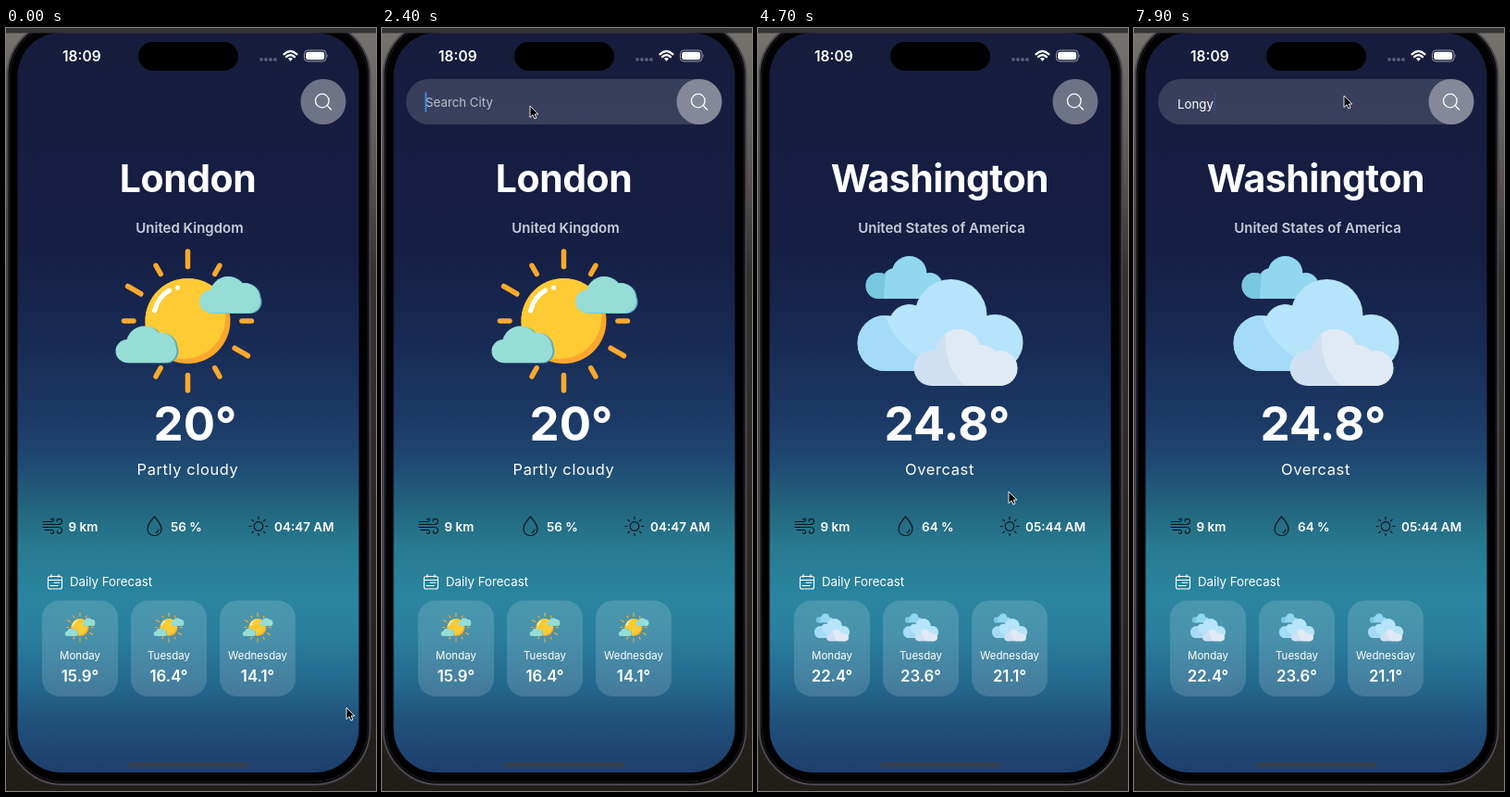
These frames come from a looping animation (400x823 px, 8 s). An HTML page:

```html
<!DOCTYPE html>
<html lang="en">
<head>
<meta charset="utf-8">
<title>Weather app</title>
<style>
html, body { margin: 0; width: 100%; height: 100%; overflow: hidden; background: #25231f; }
svg { display: block; width: 100vw; height: 100vh; font-family: Inter, Roboto, sans-serif; fill: #fff; }
.mid { text-anchor: middle; }
.city { font-size: 41px; font-weight: 700; letter-spacing: -.5px; }
.land { font-size: 15px; font-weight: 600; fill: #c9cdd9; }
.temp { font-size: 51px; font-weight: 700; }
.sky { font-size: 16.5px; letter-spacing: .6px; }
.stat { font-size: 13.5px; font-weight: 600; }
.clock { font-size: 15.5px; font-weight: 600; }
.label { font-size: 13.3px; }
.day { font-size: 11.5px; }
.deg { font-size: 16.8px; font-weight: 600; }
.line { fill: none; stroke-linecap: round; stroke-linejoin: round; }
</style>
</head>
<body>
<svg viewBox="0 0 400 823" preserveAspectRatio="none">
  <defs>
    <linearGradient id="room" x2="0" y2="1">
      <stop offset="0" stop-color="#77746f"/><stop offset=".2" stop-color="#56524f"/>
      <stop offset=".32" stop-color="#34302c"/><stop offset="1" stop-color="#211e19"/>
    </linearGradient>
    <linearGradient id="night" gradientUnits="userSpaceOnUse" x1="0" y1="0" x2="0" y2="800">
      <stop offset="0" stop-color="#161c3b"/><stop offset=".3" stop-color="#151f44"/>
      <stop offset=".42" stop-color="#182a54"/><stop offset=".53" stop-color="#1c3a66"/>
      <stop offset=".59" stop-color="#1f4b73"/><stop offset=".65" stop-color="#23667f"/>
      <stop offset=".7" stop-color="#277a91"/><stop offset=".77" stop-color="#2a859f"/>
      <stop offset=".82" stop-color="#297e9d"/><stop offset=".88" stop-color="#246a8f"/>
      <stop offset=".94" stop-color="#204f79"/><stop offset="1" stop-color="#1e3f6b"/>
    </linearGradient>
    <clipPath id="strip"><rect x="26" y="610" width="341" height="120"/></clipPath>
    <clipPath id="disc"><circle r="46"/></clipPath>

    <g id="puff">
      <rect x="-33" y="-5" width="66" height="25" rx="12.5"/>
      <circle cx="-2" cy="0" r="19.5"/><circle cx="16" cy="3.5" r="16"/>
    </g>
    <g id="back">
      <circle cx="-33" cy="-51" r="19"/><circle cx="-66" cy="-38" r="14"/><circle cx="-49" cy="-45" r="12"/>
      <circle cx="-11" cy="-38" r="14"/><rect x="-66" y="-46" width="55" height="22"/>
    </g>
    <g id="main">
      <circle cx="-59" cy="24" r="30"/><circle cx="12" cy="-6" r="39"/>
      <circle cx="60" cy="23" r="30"/><rect x="-59" y="10" width="119" height="44"/>
      <circle cx="-33" cy="4" r="22"/>
    </g>
    <g id="front">
      <circle cx="-9" cy="51" r="19"/><circle cx="20" cy="34" r="25"/>
      <circle cx="65" cy="51" r="19"/><circle cx="46" cy="43" r="17"/><rect x="-9" y="44" width="74" height="26"/>
    </g>
    <clipPath id="backClip"><circle cx="-66" cy="-38" r="14"/><circle cx="-49" cy="-45" r="12"/><rect x="-66" y="-40" width="30" height="16"/></clipPath>
    <clipPath id="mainClip"><circle cx="-59" cy="24" r="30"/><circle cx="-33" cy="4" r="22"/><rect x="-59" y="10" width="80" height="44"/></clipPath>
    <clipPath id="frontClip"><circle cx="20" cy="34" r="25"/><circle cx="65" cy="51" r="19"/><circle cx="46" cy="43" r="17"/><rect x="0" y="44" width="65" height="26"/></clipPath>

    <g id="partly">
      <g id="rays" stroke="#fba92c" stroke-width="5.5" stroke-linecap="round"></g>
      <circle r="46" fill="#fba72d"/>
      <circle cx="-5" cy="-5" r="46" fill="#fecb34" clip-path="url(#disc)"/>
      <path class="line" d="M-36-11Q-32-26-20-33" stroke="#fff" stroke-width="5"/>
      <circle cx="-11" cy="-36" r="2.6"/>
      <use href="#puff" x="47" y="-28" fill="#5fb4cf"/><use href="#puff" x="45.500" y="-28.500" fill="#96ddd6"/>
      <use href="#puff" x="-43" y="25.500" fill="#5da9b8"/><use href="#puff" x="-45" y="25" fill="#96ddd6"/>
    </g>
    <g id="overcast">
      <use href="#back" fill="#92d7ef"/>
      <path d="M-90-75H-50Q-62-50-60-20H-90Z" fill="#79c7e1" clip-path="url(#backClip)"/>
      <use href="#main" fill="#b6e4fb"/>
      <path d="M-95-25H-62Q-60 22-10 46V60H-95Z" fill="#a3dbf8" clip-path="url(#mainClip)"/>
      <use href="#front" fill="#cfe0f2"/>
      <path d="M6 5H95V75H38Q2 60 6 5Z" fill="#e0eaf5" clip-path="url(#frontClip)"/>
    </g>
  </defs>

  <rect width="400" height="823" fill="url(#room)"/>
  <rect x="1.500" y="-8" width="392" height="824" rx="60" fill="#08080a" stroke="#4b4750" stroke-width="2"/>
  <rect x="4" y="-5" width="387" height="818" rx="57" fill="#000" stroke="#1c1b20"/>
  <rect x="12.500" y="5" width="369" height="798" rx="47" fill="url(#night)"/>
  <rect width="400" height="5.500" fill="#343436"/>
  <rect x="143" y="15" width="108" height="31" rx="15.500" fill="#000"/>
  <rect x="132" y="792" width="130" height="5" rx="2.500" fill="#343f4e"/>

  <text class="clock" x="61" y="36">18:09</text>
  <g fill="#59607a"><circle cx="276" cy="34" r="1.900"/><circle cx="281" cy="34" r="1.900"/><circle cx="286" cy="34" r="1.900"/><circle cx="291" cy="34" r="1.900"/></g>
  <g class="line" stroke="#fff" stroke-width="2.300" stroke-linecap="butt">
    <path d="M300.500 28.300Q307.500 21.700 314.500 28.300M303 31.200Q307.500 27 312 31.200"/>
  </g>
  <path d="M305 33Q307.500 31 310 33L307.500 35.800Z"/>
  <rect x="322.500" y="24" width="23.500" height="12" rx="3.800" fill="none" stroke="#9499a8"/>
  <rect x="324.200" y="25.700" width="20" height="8.600" rx="2.300"/>
  <path d="M347.300 28Q349 30 347.300 32Z" fill="#9499a8"/>

  <g id="bar">
    <rect x="26" y="55" width="341.500" height="49" rx="24.500" fill-opacity=".15"/>
    <text id="query" class="label" x="47"></text>
    <rect id="caret" y="69" width="1.800" height="22" rx=".9" fill="#3d8df0"/>
  </g>
  <g id="button">
    <circle cx="343" cy="79.500" r="24.500" fill-opacity=".38"/>
    <path class="line" d="M348 84.500L351.500 88M334.500 78.500a7.300 7.300 0 1 0 14.600 0a7.300 7.300 0 1 0-14.600 0" stroke="#fff" stroke-width="1.300"/>
  </g>

  <g id="weather"></g>

  <g class="line" stroke="#fff" stroke-width="1.100">
    <rect x="45.500" y="591.500" width="15" height="13.500" rx="2"/>
    <path d="M45.500 595.500H60.500M49 589.500V592.500M57 589.500V592.500M52 598.300H58M48 601.500H56" stroke-dasharray="none"/>
  </g>
  <text class="label" x="69" y="602">Daily Forecast</text>
  <g clip-path="url(#strip)"><g id="cards"></g></g>
  <path id="cursor" d="M0 0V12.500L3 9.800L5 14L7 13L5.200 9H8.800Z" fill="#000" stroke="#fff" stroke-width=".9"/>
</svg>
<script>
const LOOP = 8000;
const $ = id => document.getElementById(id);
const days = ['Monday', 'Tuesday', 'Wednesday'];
const london = { city: 'London', land: 'United Kingdom', icon: 'partly', temp: '20°', sky: 'Partly cloudy',
  wet: '56 %', rise: '04:47 AM', shift: 0, small: .207, days: ['15.9°', '16.4°', '14.1°'] };
const washington = { city: 'Washington', land: 'United States of America', icon: 'overcast', temp: '24.8°', sky: 'Overcast',
  wet: '64 %', rise: '05:44 AM', shift: -1, small: .213, days: ['22.4°', '23.6°', '21.1°'] };

// Keys are [time, value, ...]
const pointer = [[0, 368, 733], [150, 368, 733], [600, 240, 686], [900, 183, 682], [1100, 178, 682],
  [1700, 339, 88], [1950, 339, 88], [2350, 160, 84], [3450, 160, 84], [3850, 130, 130], [4150, 130, 130],
  [4650, 271, 500], [4800, 271, 500], [5350, 340, 88], [5650, 340, 88], [6050, 227, 73]];
const scroll = [[0, 0], [550, 0], [900, -30], [1000, -32], [1350, 0]];
const press = [[0, 1], [1650, 1], [1780, .2], [1860, .2], [1980, 1], [5450, 1], [5520, .2], [5600, .2], [5700, 1]];
const searches = [
  { from: 1950, to: 4100, focus: 2400, word: 'Wash', keys: [2750, 2900, 3050, 3200] },
  { from: 5650, to: LOOP, focus: 6100, word: 'Longy', keys: [6950, 7150, 7350, 7550, 7800] }
];

function at(keys, t) {
  const i = keys.findIndex(k => k[0] > t);
  if (i < 0) return keys[keys.length - 1].slice(1);
  const a = keys[i - 1], b = keys[i], u = (t - a[0]) / (b[0] - a[0]), e = u * u * (3 - 2 * u);
  return a.slice(1).map((v, j) => v + (b[j + 1] - v) * e);
}

const text = (cls, x, y, s) => `<text class="${cls}" x="${x}" y="${y}">${s}</text>`;

function ray(deg, r1, r2) {
  return `<path transform="rotate(${deg})" d="M${r1} 0H${r2}"/>`;
}

function sunIcon(x, y) {
  const beams = Array.from({ length: 8 }, (_, i) => ray(i * 45, 7.8, 10)).join('');
  return `<g transform="translate(${x} ${y})"><circle r="4.8"/>${beams}</g>`;
}

function showWeather(w) {
  const s = w.shift;
  $('weather').innerHTML =
    text('mid city', 196.5, 177, w.city) + text('mid land', 198.5, 221, w.land) +
    `<use href="#${w.icon}" transform="translate(196.5 316)"/>` +
    text('mid temp', 204.5, 445, w.temp) + text('mid sky', 196.5, 482, w.sky) +
    `<g class="line" stroke="#10151c" stroke-width="1.200">
      <path d="M40 535.500H57Q60.500 535 60.500 532Q60 529 57 529.300Q55 529.700 55.200 532M40 532.500H49Q52 532 51.500 530Q50.500 528.500 48.500 530M40 538.500H57Q60.500 539 60.500 542Q60 545.500 57 545Q55 544.500 55.200 542.500M42 541.500H49Q52 542 51.500 544.500Q50 546 48.500 544.500"/>
      <path transform="translate(${160.5 + s} 537)" d="M0-10Q8-1 7.500 4Q6.500 10.500 0 10.500Q-6.500 10.500-7.500 4Q-8-1 0-10ZM4.500 4Q4 7 1.500 7.500"/>
      ${sunIcon(273 + s, 537.5)}</g>` +
    text('stat', 67.5, 542.5, '9 km') + text('stat', 178 + s, 542.5, w.wet) + text('stat', 290 + s, 542.5, w.rise);
  $('cards').innerHTML = days.map((day, i) => {
    const x = 80 + 96 * i;
    return `<rect x="${x - 41}" y="617.500" width="82" height="103.500" rx="19" fill-opacity=".15"/>
      <use href="#${w.icon}" transform="translate(${x} 646.500) scale(${w.small})"/>` +
      text('mid day', x, 680.5, day) + text('mid deg', x, 705, w.days[i]);
  }).join('');
}

$('rays').innerHTML = Array.from({ length: 12 }, (_, i) => {
  if (i === 5 || i === 11) return '';
  return ray(i * 30, 58.5, [1, 3, 7, 9].includes(i) ? 75 : 69);
}).join('');

let shown;
function draw(t) {
  const weather = t < 4300 ? london : washington;
  if (weather !== shown) showWeather(shown = weather);

  const search = searches.find(s => t >= s.from && t < s.to);
  $('bar').style.display = search ? '' : 'none';
  if (search) {
    const word = search.word.slice(0, search.keys.filter(k => k <= t).length);
    const query = $('query');
    query.textContent = word || 'Search City';
    query.setAttribute('y', word ? 87 : 85);
    query.setAttribute('fill', word ? '#fff' : '#b9becb');
    $('caret').setAttribute('x', word ? 47.5 + query.getComputedTextLength() : 46.5);
    $('caret').style.opacity = t < search.focus ? 0 : Math.min(1, 1 + Math.cos((t - 3300) * Math.PI / 500));
  }
  $('button').style.opacity = at(press, t)[0];
  $('cards').setAttribute('transform', `translate(${at(scroll, t)[0]} 0)`);
  $('cursor').setAttribute('transform', `translate(${at(pointer, t).join(' ')})`);
}

const start = performance.now();
function tick() {
  draw((performance.now() - start) % LOOP);
  requestAnimationFrame(tick);
}
tick();
</script>
</body>
</html>
```
